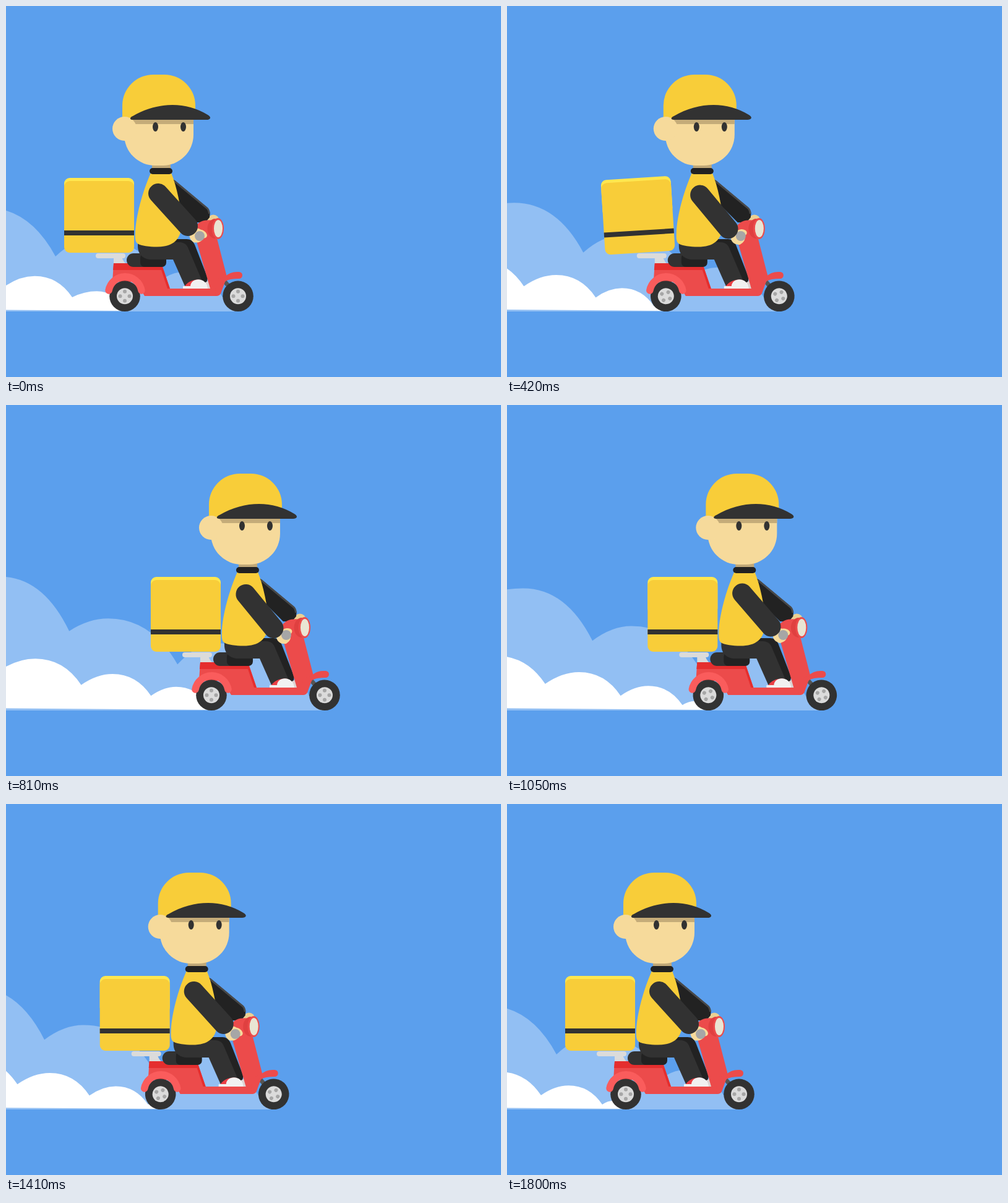
An HTML page for the animation above (1.83 s loop, 800 by 600 pixels).

```html
<!DOCTYPE html>
<html lang="en">
<head>
<meta charset="utf-8">
<title>Delivery scooter</title>
<style>
html, body { margin: 0; width: 100%; height: 100%; overflow: hidden; background: #5b9fed; }
svg { display: block; width: 100vw; height: 100vh; }
</style>
</head>
<body>
<svg viewBox="0 0 800 600">
  <defs>
    <g id="wheel">
      <circle r="24.800" fill="#323232"/>
      <circle r="13" fill="#dbdbdb"/>
      <g fill="#a6a6a6">
        <circle cy="-7.500" r="3"/><circle cx="7.500" r="3"/><circle cy="7.500" r="3"/><circle cx="-7.500" r="3"/>
      </g>
    </g>
  </defs>
  <g id="rider">
    <path id="haze" fill="#92bff3"/>
    <path id="smoke" fill="#fff"/>

    <!-- far arm and leg -->
    <circle cx="335" cy="347" r="9.500" fill="#ebd093"/>
    <path d="M270 280L325 326Q331 332 329 342L322 350H308L270 312Z" fill="#222"/>
    <path d="M272 283L325 327Q328 330 328.500 336" fill="none" stroke="#484848" stroke-width="3"/>
    <path d="M265 377H292Q301 377 305 386L326 440L323 452H290Z" fill="#222"/>

    <!-- rack and scooter body -->
    <path d="M174 404H187Q188 412 194 417H174Z" fill="#dbdbdb"/>
    <rect x="145" y="400" width="48" height="8" rx="4" fill="#dbdbdb"/>
    <path d="M352 444L366 460" stroke="#555" stroke-width="7"/>
    <path d="M322 447L328 444L331 458H322Z" fill="#ddd3d3"/>
    <path d="M305 358C312 346 325 345 337 347L341 376L357 438L347 465Q345 469 340 469H224L210 446H172L174 416H251L265 457H330L309 384Z" fill="#ec4b4b"/>
    <path d="M174 416H251L265 457H261L251 427H173Z" fill="#e52e2e"/>
    <use href="#wheel" class="wheel" data-x="192"/>
    <use href="#wheel" class="wheel" data-x="375"/>
    <path d="M166 460A26.900 26.900 0 0 1 219 460" fill="none" stroke="#fa5c5c" stroke-width="11.500" stroke-linecap="round"/>
    <path d="M338 469C350 469 346 452 355 445Q361 441 376.500 441A5.500 5.500 0 0 0 376.500 430Q362 429 354 438L340 442Z" fill="#ec4b4b"/>
    <ellipse cx="338" cy="360" rx="12.500" ry="16" fill="#e04040"/>
    <ellipse cx="342.500" cy="360" rx="9.500" ry="17" fill="#ec4b4b"/>
    <ellipse cx="343" cy="360" rx="7" ry="14" fill="#e9e5d3"/>

    <!-- seat -->
    <rect x="195" y="400" width="40" height="22" rx="11" fill="#323232"/>
    <rect x="217" y="400" width="42" height="22" rx="7" fill="#222"/>

    <!-- near leg and shoe -->
    <path d="M213 382H280C289 382 293 387 295 393L318 447L290 455L270 410H236C222 410 213 402 213 388Z" fill="#323232"/>
    <path d="M288 454C295 444 306 441 316 443V454Z" fill="#ea3f45"/>
    <path d="M286 453H298C299 438 325 438 326 457H286Z" fill="#f1f1f1"/>

    <!-- torso -->
    <rect x="236" y="252" width="30" height="12" fill="#c0a878"/>
    <path d="M234 270H267C276 292 283 325 284 350C284 380 268 389.500 244 389.500C231 389.500 219 388 213 384.500C209 382 208.500 376 209 366C210 340 220 302 234 270Z" fill="#f8cd39"/>
    <rect x="232" y="262" width="37" height="10" rx="5" fill="#222"/>
    <g id="hand" fill="#f6da9b">
      <circle cx="308" cy="371" r="11.500"/>
      <path d="M305 378A8.500 8.500 0 1 1 320.500 371" fill="none" stroke="#f6da9b" stroke-width="9" stroke-linecap="round"/>
    </g>
    <circle cx="313" cy="372" r="8" fill="#a6a6a6"/>
    <path id="arm" stroke="#323232" stroke-width="32" stroke-linecap="round"/>

    <!-- head -->
    <path d="M188 184V161A50 50 0 0 1 238 111H256A50 50 0 0 1 306 161V184Z" fill="#f8cd39"/>
    <path d="M191 183H303V208A50 50 0 0 1 253 258H241A50 50 0 0 1 191 208Z" fill="#f6da9b"/>
    <path d="M200 182H303V191H200Z" fill="#c5ac79"/>
    <circle cx="191.500" cy="198.500" r="19.500" fill="#f6da9b"/>
    <path d="M205 184C199 184 200 180 205 178C245 155 290 154 326 176C333 180 330 184 324 184Z" fill="#323232"/>
    <g fill="#323232">
      <ellipse cx="241.500" cy="195.500" rx="4.500" ry="7.500"/>
      <ellipse cx="286.500" cy="195.500" rx="4.500" ry="7.500"/>
    </g>

    <g id="box">
      <rect x="94" y="278" width="113" height="60" rx="9" fill="#ffe74f"/>
      <rect x="94" y="283" width="113" height="116" rx="9" fill="#f8cd39"/>
      <rect x="94" y="363" width="113" height="8" fill="#323232"/>
    </g>
  </g>
</svg>
<script>
const $ = id => document.getElementById(id);
const ease = t => t * t * (3 - 2 * t);

// Eases from 0 to 1 over the first "up" ticks and back to 0 over the "down" ticks before "end".
const swell = (f, up, down, end) =>
  ease(Math.max(0, Math.min(1, f / up, (end - f) / down)));

// A puff drifts back and rises with its age s; x and y give the notch in front of it.
const smoke = {
  x: s => 107 - 99 * s - 11 * s * s,
  y: s => 471 - 15 * s - 2 * s * s + 8 * Math.sin(Math.PI * s) ** 2,
  end: [195, 493], lean: .45, rise: .235,
  close: "V493L-145 490.5Z"
};
const haze = {
  x: s => 255 - 175 * s,
  y: s => 440 - 21 * s - 14 * s * s,
  end: [350, 471], lean: .36, rise: .27,
  close: "H376V494H-400Z"
};

function trail(c, phase) {
  const notch = s => c.x(s) < c.end[0] ? [c.x(s), c.y(s)] : c.end;
  let d = "";
  for (let s = 3 + phase % 1; s > -1; s--) {
    const [x, y] = notch(s), [nx, ny] = notch(s - 1);
    const span = nx - x;
    const px = x + c.lean * span, py = (y + ny) / 2 - c.rise * span;
    d += `${d ? "L" : "M"}${x} ${y}Q${(x + px) / 2} ${py} ${px} ${py}`
       + `Q${px + .62 * (nx - px)} ${py} ${nx} ${ny}`;
  }
  return d + c.close;
}

function draw(now) {
  const f = Math.floor(now % 1830 / 30);
  const x = 144 * swell(f, 30, 30, 60);
  $("rider").setAttribute("transform", `translate(${x})`);

  // Both trails stream steadily, with slow surges.
  const smokePhase = .1083 * f + .25 * Math.sin(Math.PI * f / 10);
  const hazePhase = .1 * f - .28 * Math.sin(Math.PI * f / 30) ** 2;
  $("smoke").setAttribute("d", trail(smoke, smokePhase));
  $("haze").setAttribute("d", trail(haze, hazePhase));

  for (const w of document.querySelectorAll(".wheel"))
    w.setAttribute("transform", `translate(${w.dataset.x} 469.3) rotate(${60 * f})`);

  $("box").setAttribute("transform", `rotate(${-4.1 * swell(f, 18, 9, 27)} 150.5 399)`);

  const twist = swell(f, 18, 10, 40);
  $("hand").setAttribute("transform", `rotate(${-42 * twist} 313 372)`);
  $("arm").setAttribute("d",
    `M${246 + 1.5 * twist} ${303 + 3 * twist}L${294 - 1.5 * twist} ${356 + 5 * twist}`);
}

function loop(now) {
  draw(now);
  requestAnimationFrame(loop);
}
draw(0);
requestAnimationFrame(loop);
</script>
</body>
</html>
```
